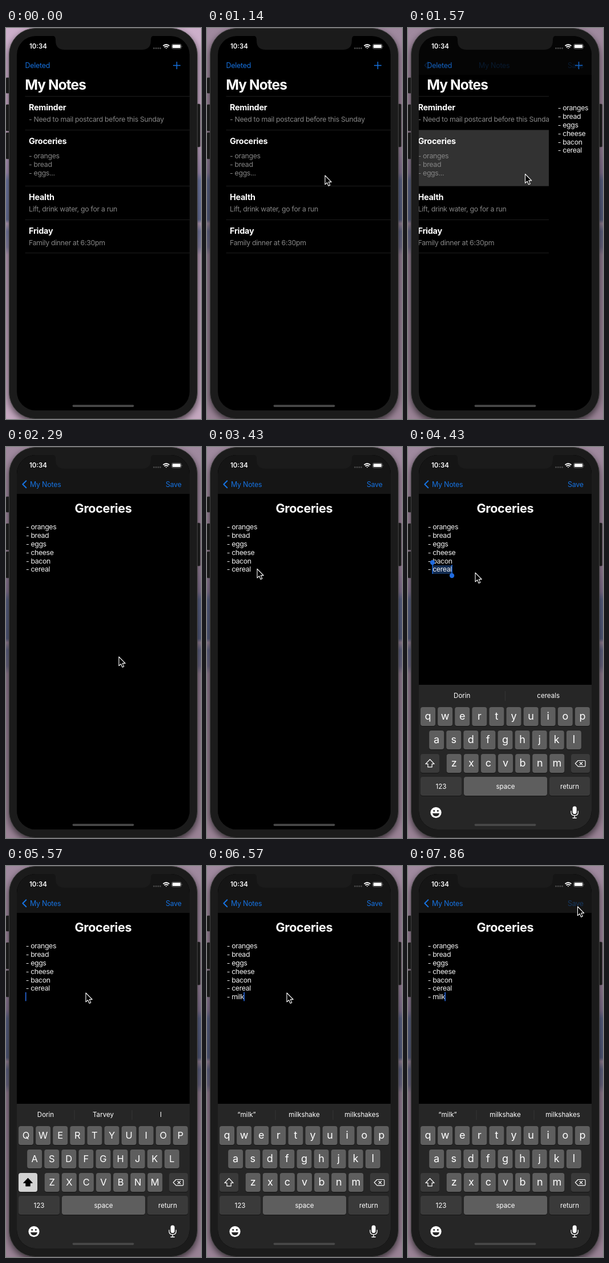
These frames come from a looping animation (342 px wide and 684 px high, 8 s). An HTML page:

```html
<!DOCTYPE html>
<html lang="en">
<head>
<meta charset="utf-8">
<title>Notes app</title>
<style>
html, body { margin: 0; width: 100%; height: 100%; overflow: hidden; background: #000; }
svg { display: block; width: 342px; height: 684px; font-family: Inter, "Open Sans", sans-serif; }
text { white-space: pre; }
.row { font-size: 14.4px; font-weight: 700; fill: #fff; letter-spacing: -.25px; }
.sub { font-size: 12.3px; fill: #858585; letter-spacing: -.3px; }
.body { font-size: 12.3px; fill: #f0f0f0; letter-spacing: -.36px; }
.link { font-size: 12.4px; fill: #1672e0; letter-spacing: -.22px; }
.mid { text-anchor: middle; fill: #fff; }
</style>
</head>
<body>
<svg id="stage" viewBox="0 0 342 684">
  <defs>
    <linearGradient id="wall" x1="0" y1="0" x2="0" y2="1">
      <stop offset="0" stop-color="#cdb0cb"/>
      <stop offset=".3" stop-color="#c2a5c2"/>
      <stop offset=".37" stop-color="#a590b6"/>
      <stop offset=".39" stop-color="#747da8"/>
      <stop offset=".49" stop-color="#6a739c"/>
      <stop offset=".5" stop-color="#b9a0ba"/>
      <stop offset=".52" stop-color="#7b7fa6"/>
      <stop offset=".56" stop-color="#8983a5"/>
      <stop offset=".58" stop-color="#b79db7"/>
      <stop offset="1" stop-color="#c5a8c0"/>
    </linearGradient>
    <filter id="blur" x="-20%" y="-20%" width="140%" height="140%"><feGaussianBlur stdDeviation="6"/></filter>
    <clipPath id="screen"><rect x="19" y="14" width="303" height="655" rx="33"/></clipPath>
    <clipPath id="left"><rect id="leftBox" x="19" y="14" width="303" height="655"/></clipPath>
  </defs>
  <rect width="342" height="684" fill="url(#wall)"/>
  <rect id="shade" width="342" height="684"/>
  <rect x="5" y="5" width="331" height="684" rx="46" opacity=".6" filter="url(#blur)"/>
  <g fill="#191919" stroke="#262626" stroke-width=".6">
    <rect x="0" y="87" width="7" height="27" rx="1.5"/>
    <rect x="0" y="134" width="7" height="46" rx="1.5"/>
    <rect x="0" y="183" width="7" height="46" rx="1.5"/>
    <rect x="333" y="133" width="7.5" height="75" rx="1.5"/>
  </g>
  <rect x="5.5" y=".5" width="330" height="683" rx="46" fill="#1b1b1b" stroke="#444"/>
  <g clip-path="url(#screen)">
    <rect x="19" y="14" width="303" height="655"/>
    <g clip-path="url(#left)"><g id="list"></g></g>
    <g id="detail"></g>
    <rect id="bar" x="19" y="14" width="303" height="68" fill="#151515"/>
    <text id="large" x="33.3" y="108" font-size="24.4" font-weight="700" fill="#fff" letter-spacing="-.9">My Notes</text>
    <g id="navList">
      <text class="link" x="33.5" y="69.5">Deleted</text>
      <path d="M293 65.5h13M299.5 59v13" stroke="#1672e0" stroke-width="1.5"/>
    </g>
    <g id="navBack">
      <path d="M35.3 59.3l-6 6 6 6" fill="none" stroke="#1672e0" stroke-width="2" stroke-linecap="round" stroke-linejoin="round"/>
      <text id="back" class="link" y="69.5">My Notes</text>
    </g>
    <text id="save" class="link" x="280" y="69.5">Save</text>
    <g id="keys"></g>
    <rect x="116.5" y="659.3" width="108" height="3.6" rx="1.8" fill="#484848"/>
  </g>
  <path d="M81 13q6 1 6 7v2q0 16 16 16h135q16 0 16-16v-2q0-6 6-7z" fill="#1b1b1b"/>
  <text x="41" y="36" font-size="11.4" font-weight="600" fill="#fff">10:34</text>
  <g fill="#474747">
    <circle cx="259.5" cy="35.5" r="1.4"/><circle cx="263.2" cy="35.5" r="1.4"/>
    <circle cx="266.9" cy="35.5" r="1.4"/><circle cx="270.6" cy="35.5" r="1.4"/>
  </g>
  <g fill="none" stroke="#fff" stroke-width="1.9">
    <path d="M275.6 31.2q5.4-4.6 10.8 0M277.6 33.6q3.4-2.9 6.8 0"/>
    <path d="M279.6 35l1.4 1.5 1.4-1.5z" fill="#fff" stroke="none"/>
  </g>
  <rect x="290.5" y="28" width="17" height="8.4" rx="2.5" fill="none" stroke="#777" stroke-width=".8"/>
  <rect x="291.8" y="29.3" width="14.4" height="5.8" rx="1.4" fill="#fff"/>
  <path d="M308.6 30.8q1.4 1.4 0 2.8z" fill="#888"/>
  <path id="mouse" d="M0 0V15.8L3.6 12.5 6.1 18.3 8.8 17.1 6.3 11.4H11.2Z" fill="#000" stroke="#fff" stroke-width="1.1" stroke-linejoin="round"/>
</svg>
<script>
const LOOP = 8000;
const $ = id => document.getElementById(id);
const label = (x, y, s, attrs) => `<text x="${x}" y="${y}" ${attrs}>${s}</text>`;
const box = (x, y, w, h, fill, more = '') =>
  `<rect x="${x}" y="${y}" width="${w}" height="${h}" fill="${fill}" ${more}/>`;

// Note list
const notes = [
  [119, 'Reminder', ['- Need to mail postcard before this Sunday'], 163.5],
  [178, 'Groceries', ['- oranges', '- bread', '- eggs...'], 228],
  [276, 'Health', ['Lift, drink water, go for a run'], 320.5],
  [335, 'Friday', ['Family dinner at 6:30pm'], 379.5]
];
$('list').innerHTML = box(19, 178, 330, 98, '#323232', 'id="press"') +
  notes.map(([y, title, lines, ly]) =>
    box(33.5, y, 289, 1, '#1d1d1d') + label(40, y + 25, title, 'class="row"') +
    lines.map((s, i) => label(40, ly + i * 14.8, s, 'class="sub"')).join('')).join('') +
  box(33.5, 393, 289, 1, '#1d1d1d');

// Open note
const items = ['oranges', 'bread', 'eggs', 'cheese', 'bacon', 'cereal'];
$('detail').innerHTML = box(19, 14, 303, 655, '#000') +
  label(170.3, 114.5, 'Groceries', 'class="mid" font-size="21.6" font-weight="700" letter-spacing="-.35"') +
  `<g id="pick">${box(43, 207, 34, 15, '#122c52')}</g>` +
  items.map((s, i) => label(34.8, 144.4 + i * 14.8, '- ' + s, 'class="body"')).join('') +
  label(34.8, 233.2, '', 'class="body" id="typed"') +
  `<g id="grips" fill="#1f6be0">${box(42.3, 204, 1.5, 18, '#1f6be0')}${box(76.3, 206, 1.5, 18, '#1f6be0')}
  <circle cx="43" cy="202" r="4.2"/><circle cx="77" cy="225" r="4.2"/></g>` +
  box(0, 0, 1.7, 15.5, '#2767d8', 'id="caret"');

// Keyboard
const GREY = '#5e5e5e', DARK = '#3a3a3a';
const key = (x, y, w, fill, id = '') =>
  box(x, y + 1, w, 33, '#141414', 'rx="4"') + box(x, y, w, 33, fill, 'rx="4" ' + id);
const rows = [['qwertyuiop', 35, 455], ['asdfghjkl', 50.1, 496], ['zxcvbnm', 80.7, 537]];
const small = 'class="mid" font-size="11.6"';
$('keys').innerHTML = box(19, 416, 303, 300, '#262626') +
  '<g id="hints"></g>' +
  rows.map(([s, x, y]) => [...s].map((c, i) =>
    key(x + i * 30.1 - 13, y, 26, GREY) +
    label(x + i * 30.1, y + 22, c, 'class="mid letter" font-size="18"')).join('')).join('') +
  key(22, 537, 33, DARK, 'id="shift"') + key(286, 537, 33, DARK) +
  key(22, 577, 72, DARK) + key(98, 577, 146, GREY) + key(248, 577, 71, DARK) +
  label(58, 597.5, '123', small) + label(171, 597.5, 'space', small) + label(283.5, 597.5, 'return', small) +
  `<path id="arrow" d="M38.5 546.5l-7.6 7.8h4v5.6h7.2v-5.6h4z" stroke-width="1.2" stroke-linejoin="round"/>
  <path d="M298.3 548.5h11.2q1.5 0 1.5 1.5v7.4q0 1.5-1.5 1.5h-11.2l-5-5.2zM300.8 551l5.4 5.4M306.2 551l-5.4 5.4" fill="none" stroke="#fff" stroke-width="1.2" stroke-linejoin="round"/>
  <circle cx="49" cy="639.5" r="9.6" fill="#fff"/>
  <circle cx="45.7" cy="636.5" r="1.5" fill="#262626"/><circle cx="52.3" cy="636.5" r="1.5" fill="#262626"/>
  <path d="M43 640.7h12q-1 5.4-6 5.4t-6-5.4z" fill="#262626"/>
  <rect x="288.7" y="628.5" width="7" height="13.6" rx="3.5" fill="#fff"/>
  <path d="M286 636.5v2.2q0 5.9 6.2 5.9t6.2-5.9v-2.2M292.2 644.6v4.2M288.6 649h7.2" fill="none" stroke="#fff" stroke-width="1.3"/>`;
const letters = [...document.querySelectorAll('.letter')];

// Timed states: [from ms, value]
const typing = [[0, ''], [5710, '-'], [5850, '- '], [6000, '- m'], [6140, '- mi'], [6290, '- mil'], [6570, '- milk']];
const hints = [
  [0, ['“cereal”', '', '']], [4250, ['Dorin', 'cereals']], [4570, ['Dorin', 'Tarvey', 'I']],
  [5710, ['“-”', '', '']], [5850, ['I', 'The', 'I’m']], [6000, ['“m”', 'my', 'me']],
  [6140, ['“mi”', 'mind', 'mine']], [6290, ['“mil”', 'milk', 'mile']],
  [6570, ['“milk”', 'milkshake', 'milkshakes']]
];
const path = [
  [140, 232, 690], [600, 222, 400], [1140, 207, 258], [1570, 205.5, 255.5], [1750, 206, 262],
  [2290, 198, 367], [2600, 202, 415], [2800, 196, 410], [3300, 87, 213], [3710, 91, 214],
  [4100, 108, 217], [4430, 118, 220], [4800, 140, 222], [6700, 140, 222], [7400, 292, 58],
  [7600, 295, 56], [7860, 297.5, 71], [8000, 297.5, 71]
];
const at = (list, t) => list.filter(s => s[0] <= t).pop()[1];
const clamp = v => Math.max(0, Math.min(1, v));
const smooth = v => v * v * (3 - 2 * v);
const show = (id, v) => $(id).setAttribute('opacity', +v);
const move = (id, x, y) => $(id).setAttribute('transform', `translate(${x} ${y})`);

function mouseAt(t) {
  const i = path.findIndex(p => p[0] > t);
  if (i < 1) return path[i ? path.length - 1 : 0].slice(1);
  const [a, x0, y0] = path[i - 1], [b, x1, y1] = path[i];
  const k = smooth((t - a) / (b - a));
  return [x0 + (x1 - x0) * k, y0 + (y1 - y0) * k];
}

function drawHints(words) {
  const w = 303 / words.length;
  $('hints').innerHTML = words.map((s, i) =>
    label(19 + w * (i + .5), 439, s, small) +
    (i ? box(19 + w * i - .5, 427, 1, 17, '#343434') : '')).join('');
}

// Solid after each edit, then blinking once a second
function caretAlpha(t) {
  const edits = [3570, 4570, 5430, ...typing.slice(1).map(e => e[0])];
  const c = (t - edits.filter(e => e <= t).pop()) % 1000;
  return clamp((570 - c) / 150) + clamp((c - 820) / 100);
}

let shown;
function draw(t) {
  show('shade', .22 * clamp((t - 140) / 1000));

  // Push transition: critically damped spring
  const s = Math.max(0, t - 1491.5) * .012;
  const p = 1 - (1 + s) * Math.exp(-s);
  move('list', -91 * p, 0);
  move('detail', 303 * (1 - p), 0);
  $('leftBox').setAttribute('width', 303 * (1 - p));
  show('press', t >= 1290);
  show('bar', p);
  show('large', clamp((.75 - p) / .45));
  show('navList', 1 - p ** 1.5);
  show('navBack', p ** 1.2);
  $('back').setAttribute('x', 42 + 109 * (1 - p));
  show('save', t >= 7800 ? .36 : p ** 1.2);

  // Keyboard
  const k = 1 - clamp((t - 3525) / 328);
  move('keys', 0, 253 * k ** 3);
  const upper = t >= 4570 && t < 5710;
  for (const el of letters) {
    const c = el.textContent;
    el.textContent = upper ? c.toUpperCase() : c.toLowerCase();
    el.setAttribute('font-size', upper ? 16.5 : 18);
  }
  $('shift').setAttribute('fill', upper ? '#d2d2d2' : DARK);
  $('arrow').setAttribute('fill', upper ? '#000' : 'none');
  $('arrow').setAttribute('stroke', upper ? '#000' : '#fff');
  const words = at(hints, t);
  if (words !== shown) drawHints(shown = words);

  // Text, selection and caret
  const text = at(typing, t), picked = t >= 4250 && t < 4570, newLine = t >= 4570;
  $('typed').textContent = text;
  show('pick', picked);
  show('grips', picked);
  const x = newLine ? 33.8 + (text ? $('typed').getComputedTextLength() : 0) : 76.3;
  move('caret', x, newLine ? 220.8 : 206.2);
  show('caret', t < 3570 || picked ? 0 : caretAlpha(t));

  const [mx, my] = mouseAt(t);
  move('mouse', mx, my);
  show('mouse', t >= 140);
}

const start = performance.now();
function tick() {
  draw((performance.now() - start) % LOOP);
  requestAnimationFrame(tick);
}
draw(0);
requestAnimationFrame(tick);
</script>
</body>
</html>
```
